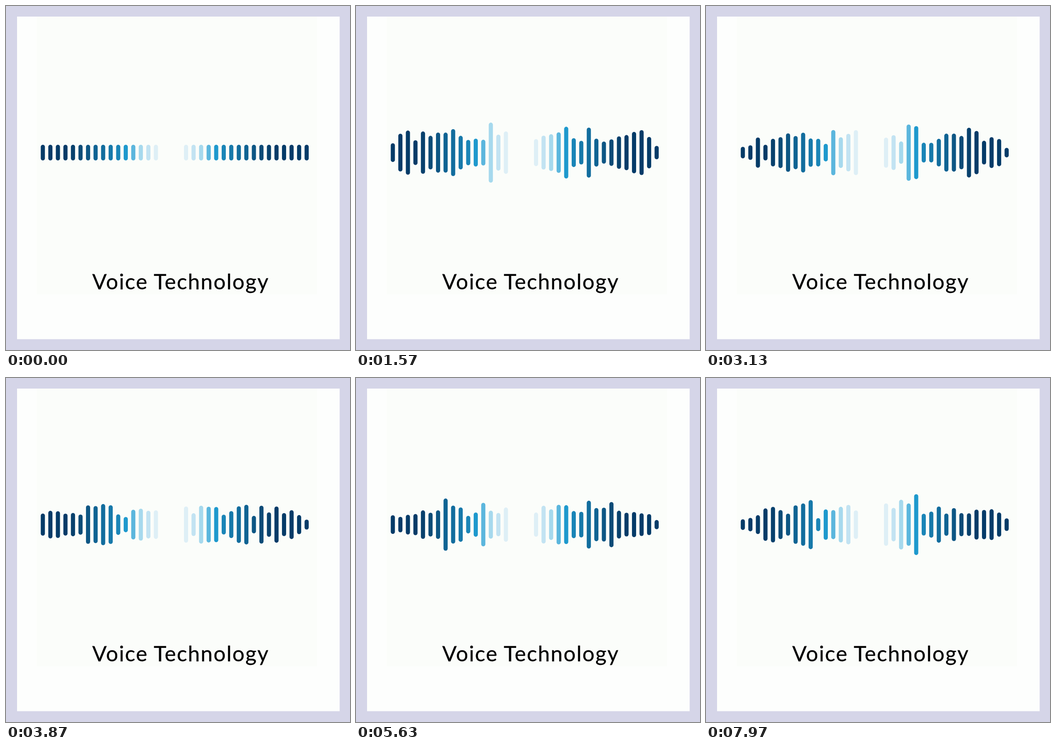
These frames come from a looping animation (748x748 px, 8000 ms). An HTML page:

```html
<!DOCTYPE html>
<html lang="en">
<head>
<meta charset="utf-8">
<title>Voice Technology</title>
<style>
  html, body { margin: 0; width: 100%; height: 100%; overflow: hidden; background: #d5d5e8; }
  svg { display: block; width: 100%; height: 100%; }
  line { stroke-width: 9; stroke-linecap: round; }
  text { font: 46.5px Lato, "Open Sans", sans-serif; letter-spacing: 1.9px; text-anchor: middle;
         stroke: #000; stroke-width: .3; stroke-linejoin: round; }
</style>
</head>
<body>
<svg viewBox="0 0 748 748">
  <rect width="748" height="748" fill="#d5d5e8"/>
  <rect x="24" y="23" width="701.5" height="701.5" fill="#fdfefd"/>
  <rect x="67" y="23" width="609" height="604" fill="#fbfdfa"/>
  <g id="bars"></g>
  <text x="380" y="616">Voice Technology</text>
</svg>
<script>
const LOOP = 8000, FRAME_MS = 100 / 3;
const COUNT = 33, LEFT = 16, PITCH = 16.39;
const CENTER_Y = 318.8, BAR_WIDTH = 9, REST_HEIGHT = 34, MIN_HEIGHT = 14;

// Colours run outwards from the gap in the middle; the last one repeats.
const palette = ['#deeff6', '#c2e3f2', '#a6d9ed', '#5bb6dd', '#1e99cd', '#1a85b7', '#1779aa',
  '#126d9e', '#0f6393', '#0d5684', '#0b4b77', '#08416d', '#053b68'];

// Outline of the voice wave: [bar, average height].
const outline = [[0, 36], [2, 64], [5, 64], [8, 102], [10, 48], [12, 90], [15, 72],
  [20, 94], [21, 56], [23, 82], [29, 74], [32, 24]];

const clamp = v => Math.min(1, Math.max(0, v));
const mix = (a, b, u) => a + (b - a) * u;
const smooth = u => u * u * (3 - 2 * u);

const random = (a, b) => {
  const v = Math.sin(a * 12.9898 + b * 78.233) * 43758.5453;
  return v - Math.floor(v);
};

function along(points, x) {
  const k = Math.max(1, points.findIndex(p => p[0] >= x));
  const [x0, y0] = points[k - 1], [x1, y1] = points[k];
  return mix(y0, y1, (x - x0) / (x1 - x0));
}

const bars = Array.from({ length: COUNT }, (_, i) => {
  const line = document.createElementNS('http://www.w3.org/2000/svg', 'line');
  const x = 80.1 + PITCH * (i < LEFT ? i : i + 3);
  const distance = i < LEFT ? LEFT - 1 - i : i - LEFT;
  line.setAttribute('x1', x);
  line.setAttribute('x2', x);
  line.setAttribute('stroke', palette[Math.min(distance, palette.length - 1)]);
  document.getElementById('bars').append(line);
  return { line, average: along(outline, i) };
});

// Each wave has its own seeded period and phase, so neighbours never move together.
function wave(i, seed, time) {
  const period = mix(420, 900, random(i, seed));
  return Math.sin(2 * Math.PI * (time / period + random(i, seed + 1)));
}

function heightAt(i, time) {
  const loudness = mix(1.14, 0.95, smooth(clamp((time - 2000) / 1500)));
  const swing = 1 + 0.3 * wave(i, 3, time) + 0.2 * wave(i, 7, time);
  const voice = bars[i].average * loudness * swing;
  return Math.max(MIN_HEIGHT, mix(REST_HEIGHT, voice, smooth(clamp(time / 350))));
}

function draw(elapsed) {
  const frame = Math.floor((elapsed % LOOP) / FRAME_MS + 0.2);
  const time = Math.min(frame * FRAME_MS, LOOP - FRAME_MS);
  bars.forEach(({ line }, i) => {
    const half = (heightAt(i, time) - BAR_WIDTH) / 2;
    line.setAttribute('y1', CENTER_Y - half);
    line.setAttribute('y2', CENTER_Y + half);
  });
}

const start = performance.now();
function tick() {
  draw(performance.now() - start);
  requestAnimationFrame(tick);
}
tick();
</script>
</body>
</html>
```
